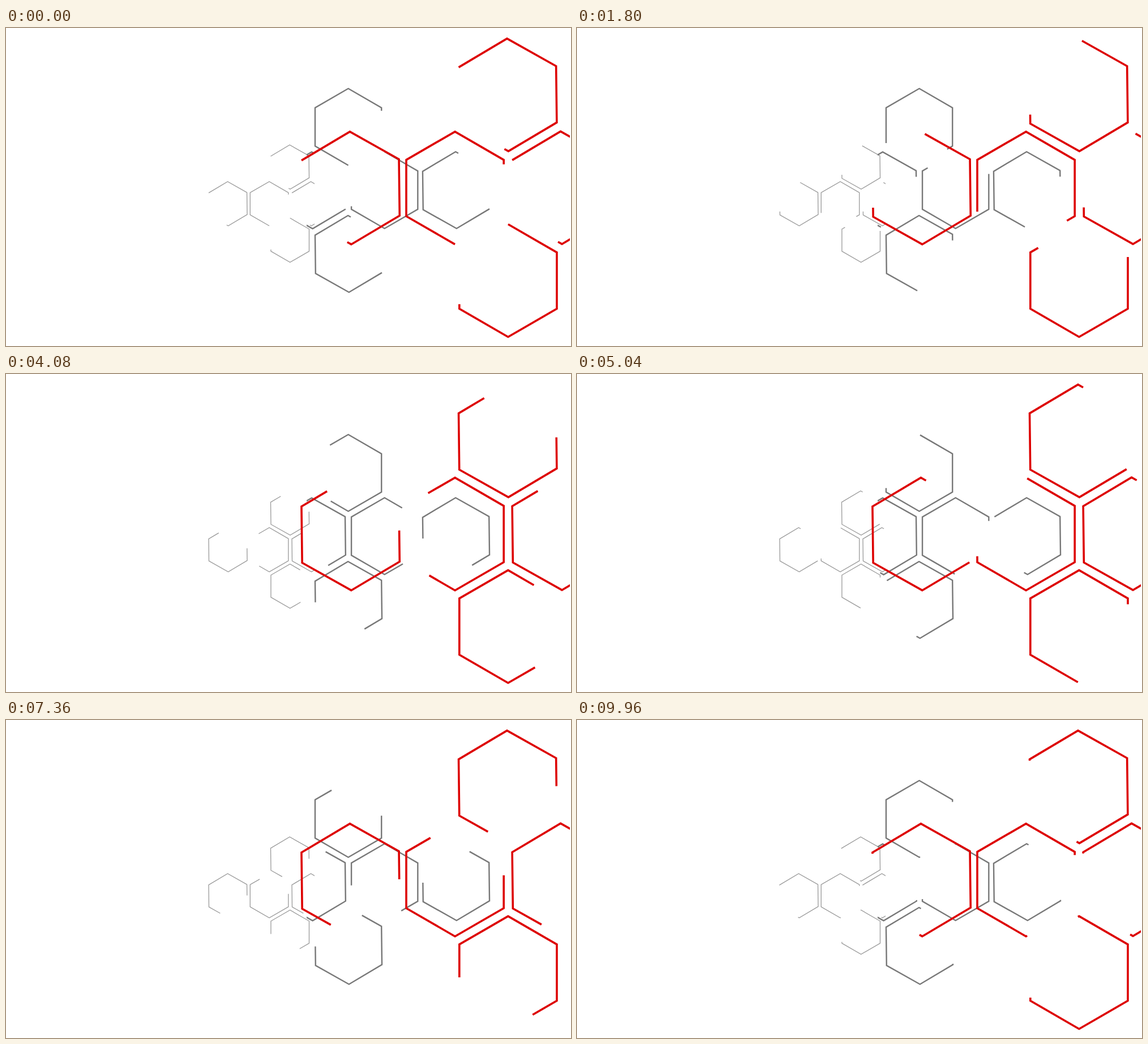
Write an HTML page that moves like this. It is 998 by 561 pixels and loops after 10000 ms.

```html
<!DOCTYPE html>
<html lang="en">
<head>
<meta charset="utf-8">
<title>Hexagon outlines</title>
<style>
  html, body { margin: 0; width: 100%; height: 100%; overflow: hidden; background: #fff; }
  svg { display: block; width: 998px; height: 561px; }
  path {
    fill: none;
    stroke-dasharray: 4.08 20;
    animation: run 10s linear infinite;
  }
  .small { stroke: #999; stroke-width: 1.3; }
  .medium { stroke: #777; stroke-width: 2.4; }
  .large { stroke: #d00; stroke-width: 3.6; }
  @keyframes run {
    from { stroke-dashoffset: 0; }
    to { stroke-dashoffset: -6; }
  }
</style>
</head>
<body>
<svg viewBox="0 0 998 561">
  <clipPath id="smallClip"><rect width="545" height="561"/></clipPath>
  <clipPath id="mediumClip"><rect x="531" width="467" height="561"/></clipPath>
  <clipPath id="largeClip"><rect width="996" height="561"/></clipPath>
</svg>
<script>
  const svg = document.querySelector('svg');
  const TILT = 0.7;

  // Each hexagon: centre x, centre y, side on which the line starts, clipped or not.
  // Sides are counted clockwise from the top corner.
  const layers = [
    { name: 'small', radius: 39, hexes: [
      [392, 310, 5], [465, 310, 3], [501.5, 245.3, 5], [539, 310, 5, true], [501.7, 374.3, 0]
    ] },
    { name: 'medium', radius: 67.7, hexes: [
      [604.6, 174.5, 3], [540.8, 286.3, 2, true], [668.7, 286, 0], [795, 286, 2], [605, 398.5, 2]
    ] },
    { name: 'large', radius: 99.4, hexes: [
      [886.2, 118, 5], [608.6, 282.3, 5], [793.1, 282.3, 3], [980.8, 281.8, 5, true], [886.9, 445.6, 0]
    ] }
  ];

  function node(tag, attrs, parent) {
    const el = document.createElementNS('http://www.w3.org/2000/svg', tag);
    for (const key in attrs) el.setAttribute(key, attrs[key]);
    return parent.appendChild(el);
  }

  // Two laps, so the dash can cross the top corner with a proper join.
  function hexPath(cx, cy, radius, tilt) {
    const points = [];
    for (let i = 0; i <= 12; i++) {
      const angle = (i * 60 - 90 - tilt) * Math.PI / 180;
      points.push((cx + radius * Math.cos(angle)).toFixed(2) + ' ' +
                  (cy + radius * Math.sin(angle)).toFixed(2));
    }
    return 'M' + points.join('L');
  }

  for (const { name, radius, hexes } of layers) {
    const group = node('g', { class: name }, svg);
    for (const [cx, cy, start, clipped] of hexes) {
      const parent = clipped ? node('g', { 'clip-path': `url(#${name}Clip)` }, group) : group;
      const tilt = start % 3 ? TILT : 0;
      const path = node('path', { d: hexPath(cx, cy, radius, tilt), pathLength: 12 }, parent);
      path.style.animationDelay = -start / 6 * 10 + 's';
    }
  }
</script>
</body>
</html>
```
